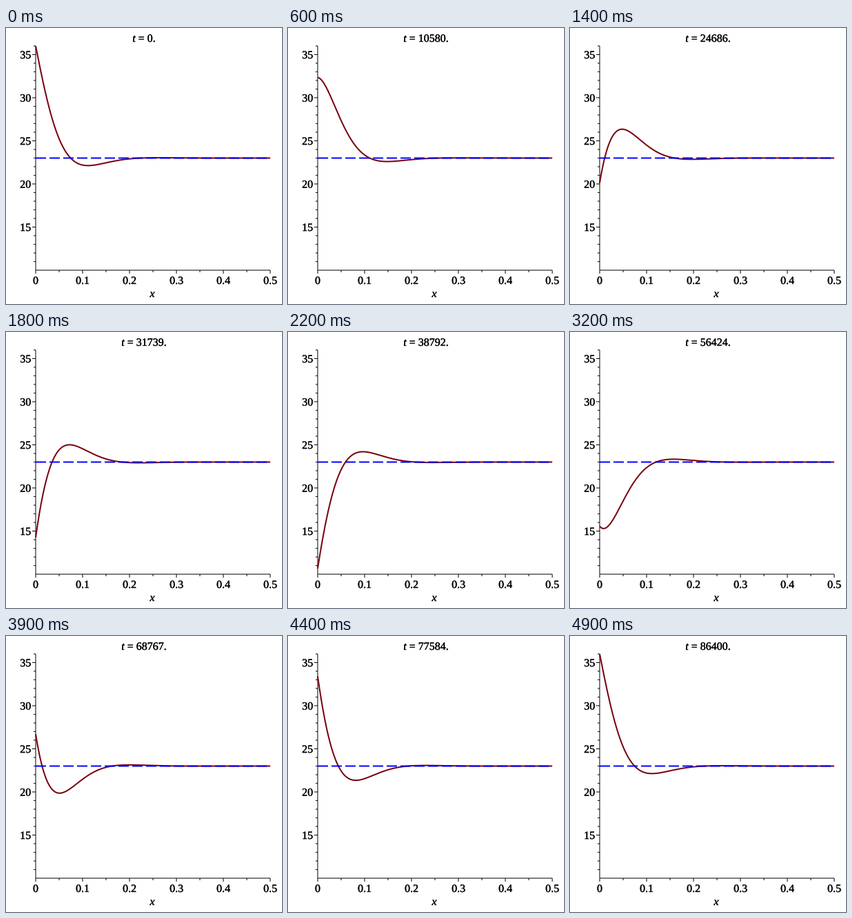
A matplotlib script that plays this animation: 400 by 400 pixels, repeating every 5 s.

```python
import numpy as np
import matplotlib.pyplot as plt
from matplotlib.animation import FuncAnimation
from matplotlib.patheffects import withStroke

SIZE, DPI = 400, 100
FRAMES, INTERVAL = 50, 100
PERIOD = 86400            # one day in seconds
MEAN, AMPLITUDE, DAMPING = 23, 13, 21.1
PX = 72 / DPI             # one pixel in points
LEFT, RIGHT, TOP, BOTTOM = 43, 383, 26, 351
FONT = dict(family="Liberation Serif", size=16 * PX, color="black",
            path_effects=[withStroke(linewidth=0.3 * PX, foreground="black")])


def to_px(x):
    return LEFT + x / 0.5 * (RIGHT - LEFT)


def to_py(y):
    return TOP + (36 - y) / 26 * (BOTTOM - TOP)


fig = plt.figure(figsize=(SIZE / DPI, SIZE / DPI), dpi=DPI, facecolor="white")
ax = fig.add_axes([0, 0, 1, 1])
ax.set(xlim=(0, SIZE), ylim=(SIZE, 0))
ax.axis("off")


def rule(xs, ys):
    ax.plot(xs, ys, color="black", lw=PX, solid_capstyle="butt", snap=False)


def label(x, y, text, **kw):
    return ax.text(x, y, text, va="baseline", **FONT, **kw)


# Axes, ticks and labels
rule([LEFT, LEFT], [TOP, BOTTOM])
rule([LEFT, RIGHT], [BOTTOM, BOTTOM])
for value in range(11, 37):
    y = to_py(value)
    major = value % 5 == 0
    rule([LEFT - (5 if major else 3), LEFT], [y, y])
    if major:
        label(36.2, y + 5.6, str(value), ha="right")
for step in range(11):
    x = to_px(step * 0.05)
    major = step % 2 == 0
    rule([x, x], [BOTTOM, BOTTOM + (5 if major else 3)])
    if major:
        label(x, 371, f"{step * 0.05:.1f}" if step else "0", ha="center")
label(212, 390, "x", ha="center", style="italic")

# Temperature profile and its mean
depth = np.linspace(0, 0.5, 400)
curve, = ax.plot([], [], color="#78000e", lw=2 * PX, solid_capstyle="butt",
                 snap=False)
ax.plot([LEFT, RIGHT], [to_py(MEAN)] * 2, color="#0000ff", lw=2 * PX,
        dashes=(7.5, 2.5), dash_capstyle="butt", snap=False)

time_name = label(0, 20, "t", ha="left", style="italic")
time_value = label(0, 20, "", ha="left")


def draw(i):
    fraction = i / (FRAMES - 1)
    phase = 2 * np.pi * fraction - DAMPING * depth
    temp = MEAN + AMPLITUDE * np.exp(-DAMPING * depth) * np.cos(phase)
    curve.set_data(to_px(depth), to_py(temp))

    seconds = str(round(PERIOD * fraction))
    start = 200 - (25.5 + 8 * len(seconds)) / 2
    time_name.set_x(start)
    time_value.set_x(start + 4.45)
    time_value.set_text(f" = {seconds}.")
    return curve, time_name, time_value


anim = FuncAnimation(fig, draw, frames=FRAMES, interval=INTERVAL,
                     repeat=True, repeat_delay=0)
plt.show()
```
